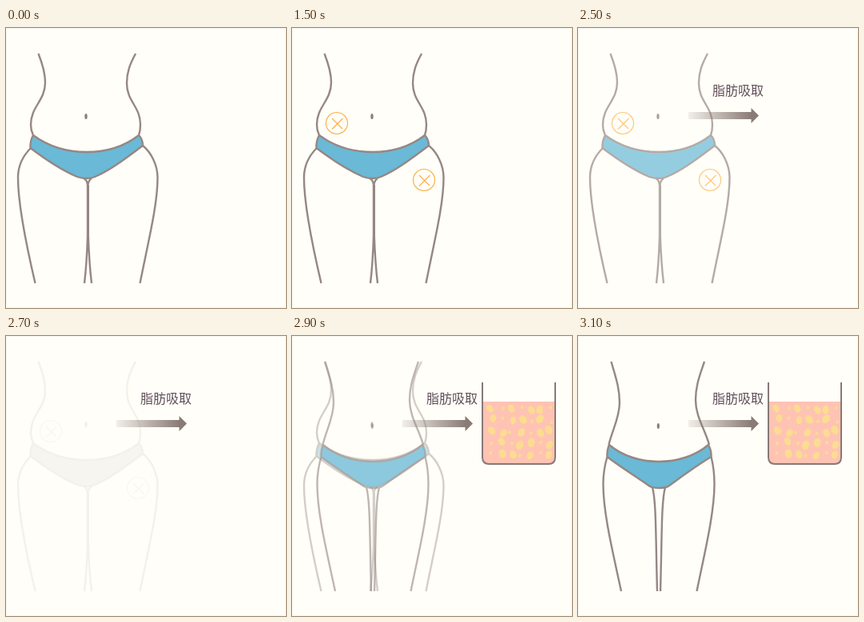
These frames come from a looping animation (350x350 px, 4.1 s). An HTML page:

```html
<!DOCTYPE html>
<html lang="zh">
<head>
<meta charset="utf-8">
<style>
html, body { margin: 0; width: 100%; height: 100%; overflow: hidden; background: #fffef8; }
svg { display: block; width: 100vw; height: 100vh; }
.line { fill: none; stroke: #968783; stroke-width: 2.4; stroke-linejoin: round; }
.brief { fill: #69b9d7; }
.navel { fill: #8c7d79; }
.mark { fill: none; stroke: #f8b24c; stroke-width: 1.2; }
.label { font: 16px "Noto Sans CJK SC", "Noto Sans CJK JP", "Noto Sans CJK", sans-serif; fill: #604f5b; }
</style>
</head>
<body>
<svg viewBox="0 0 350 350">
  <defs>
    <linearGradient id="fade">
      <stop offset="0" stop-color="#8a7b76" stop-opacity=".12"/>
      <stop offset="1" stop-color="#8a7b76"/>
    </linearGradient>
    <g id="cross" class="mark">
      <circle r="13.5"/>
      <path d="M-6-6L7 7M7.500-6L-6 7.500"/>
    </g>
  </defs>
  <rect width="350" height="350" fill="#fffef8"/>
  <rect x=".5" y=".5" width="349" height="349" fill="none" stroke="#f7f5f0"/>

  <g id="before">
    <path class="line" d="M40.500 32C46 46 49 56 49 68C49 91 31 98 31 121Q31 128 34 134
      M162 32C155 45 151 55 151 69C151 92 168 98 168 121Q168 128 166 134
      M31 150C22 159 15 171 15 187C15 221 25 270 36.500 319
      M171 147C181 155 189.500 171 189.500 187C189.500 221 178 266 167.500 319
      M97 188Q102 190 102 198Q103 190 107 188
      M102 196V260Q101 294 98 319M102.800 196V260Q104 294 107 319"/>
    <path class="line brief" d="M34 134C72 162 130 162 166 134Q171 139 171 147C152 161 132 177 111 186Q107 188 101 188Q94 188 89 186C68 177 49 164 30.500 150Q30 141 34 134Z"/>
    <ellipse class="navel" cx="100" cy="110.500" rx="1.700" ry="3.500"/>
  </g>

  <g id="after">
    <path class="line" d="M41.500 32C47 51 52 65 52 83C52 103 42 119 38.500 136
      M158 32C152 50 147 62 147 80C147 101 159 117 164 136
      M36.500 151C33 163 31.500 172 31.500 185C31.500 222 44 272 54 319
      M166.500 151C169.500 163 170.500 172 170.500 185C170.500 222 158 272 148.500 319
      M93 189C98 208 97 250 99 319M109 189C104 208 105 250 103 319"/>
    <path class="line brief" d="M39 136C72 164 130 164 163 136Q167 143 166.500 151C148 162 132 174 114 187Q110 190 102 190Q94 190 90 188C70 174 52 163 36.500 151Q36 143 39 136Z"/>
    <ellipse class="navel" cx="100.300" cy="112.500" rx="1.600" ry="3.500"/>
  </g>

  <use id="cross1" href="#cross" x="56" y="119"/>
  <use id="cross2" href="#cross" x="165" y="190"/>

  <g id="arrow">
    <rect x="138" y="105" width="79" height="9" fill="url(#fade)"/>
    <path d="M216.500 100L226 109.500L216.500 119Z" fill="#8a7b76"/>
    <text class="label" x="168" y="83.500">脂肪吸取</text>
  </g>

  <g id="jar">
    <path d="M238 82H329V152Q329 160 321 160H246Q238 160 238 152Z" fill="#ffc3b3"/>
    <g id="cells" fill="#fbdc91"/>
    <path d="M238 58V151.500Q238 160 246.500 160H320.500Q329 160 329 151.500V58" fill="none" stroke="#887974" stroke-width="2"/>
  </g>
</svg>
<script>
const $ = id => document.getElementById(id);

let seed = 11;
function random() {
  seed = (seed * 16807) % 2147483647;
  return seed / 2147483647;
}
const spread = range => (random() * 2 - 1) * range;

function addCell(x, y, r, turn) {
  const cell = document.createElementNS('http://www.w3.org/2000/svg', 'ellipse');
  cell.setAttribute('rx', r * .84);
  cell.setAttribute('ry', r * 1.1);
  cell.setAttribute('transform', `translate(${x} ${y}) rotate(${turn})`);
  $('cells').append(cell);
}

// Jittered grid: two cells in five are small
const COLS = 7, ROWS = 5;
for (let i = 0; i < COLS * ROWS; i++) {
  const x = 250 + (i % COLS) * 12.2 + spread(2.5);
  const y = 91 + Math.floor(i / COLS) * 14.3 + spread(2.5);
  const small = i % 5 % 2 === 1;
  addCell(x, y, small ? 2 : 4.9 + spread(.5), spread(40));
}

const LOOP = 4100;
const FADE_START = 2500;
const SWAP_START = 2800;

// Three stepped frames, then fully done
function stepped(t, start) {
  const n = Math.floor((t - start) / 100) + 1;
  return n <= 0 ? 0 : n > 3 ? 1 : n * .3;
}

function show(id, alpha) {
  $(id).style.opacity = alpha;
}

function render(t) {
  const swapping = t >= SWAP_START;
  const gone = stepped(t, FADE_START);
  const swapped = stepped(t, SWAP_START);
  show('before', 1 - (swapping ? swapped : gone));
  show('after', swapped);
  show('cross1', t < 1000 ? 0 : 1 - gone);
  show('cross2', t < 1500 ? 0 : 1 - gone);
  show('arrow', t < 2000 ? 0 : 1);
  show('jar', swapping ? 1 : 0);
  const filter = !swapping && gone > .8 ? 'grayscale(1)' : 'none';
  for (const id of ['before', 'cross1', 'cross2']) $(id).style.filter = filter;
}

const start = performance.now();
function tick() {
  render((performance.now() - start) % LOOP);
  requestAnimationFrame(tick);
}
tick();
</script>
</body>
</html>
```
